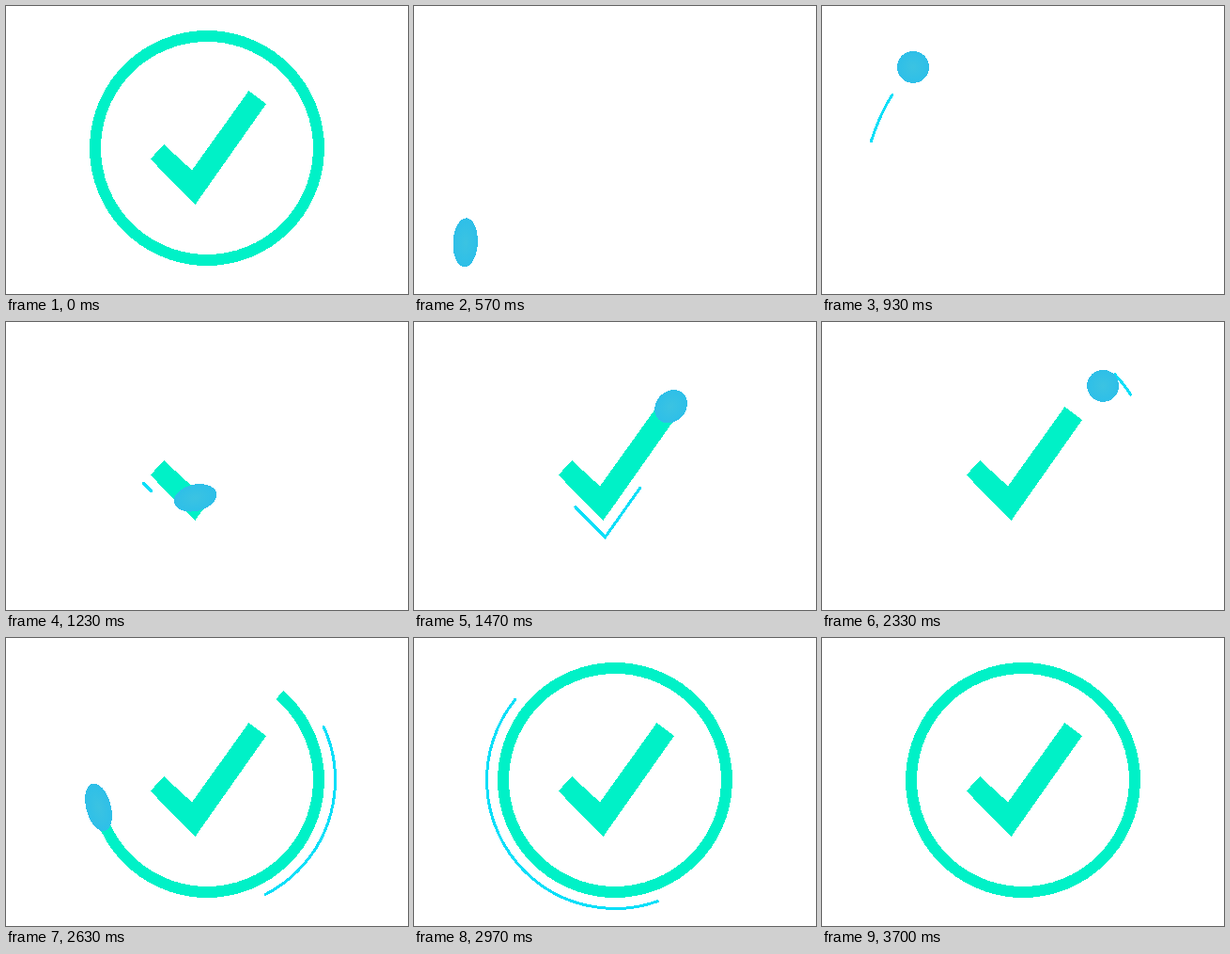
An HTML page for the animation above (4010 ms loop, 428 px wide and 306 px high).

```html
<!DOCTYPE html>
<html lang="en">
<head>
<meta charset="utf-8">
<title>Check mark</title>
<style>
  html, body { margin: 0; width: 100%; height: 100%; overflow: hidden; background: #fff; }
  svg { display: block; width: 100%; height: 100%; shape-rendering: crispEdges; }
  .thin { fill: none; stroke: #0adff8; stroke-width: 3; stroke-linecap: round; }
  .bubble { fill: none; stroke: #2fb9dc; stroke-width: 1; }
</style>
</head>
<body>
<svg viewBox="0 0 428 306">
  <defs>
    <radialGradient id="blue">
      <stop offset="0" stop-color="#3bc3e2"/>
      <stop offset="1" stop-color="#2ebfe8"/>
    </radialGradient>
    <mask id="reveal" maskUnits="userSpaceOnUse" x="0" y="0" width="428" height="306">
      <path id="bounce" d="M110 65Q135 128 161 155L197 193L267 97L296 65" fill="none" stroke="#fff" stroke-width="28"/>
    </mask>
  </defs>
  <circle id="ring" cx="214" cy="151" r="119" pathLength="360" transform="rotate(-49.5 214 151)" fill="none" stroke="#00f1c7" stroke-width="12"/>
  <path id="check" d="M168.4 147.4L198 174.5L258.5 90L277 104L201.5 211L153.6 162.5Z" fill="#00f1c7"/>
  <path id="rise" class="thin" pathLength="1" d="M41 185Q55 124 75 94"/>
  <path id="hook" class="thin" pathLength="1" d="M146.5 171.5L203.6 228.6L287 111"/>
  <circle id="orbit" class="thin" cx="214" cy="151" r="136.5" pathLength="360" transform="rotate(-45 214 151)"/>
  <circle id="bubbleA" class="bubble"/>
  <circle id="bubbleB" class="bubble"/>
  <ellipse id="ball" fill="url(#blue)"/>
</svg>
<script>
const LOOP = 4010;
const RISE = 500, DROP = 1000, CORNER = 1220, REST = 1680, SPIN = 2260, SPIN_END = 2950, DONE = 3700;
const RADIUS = 17, RING_START = -46.3;

const $ = id => document.getElementById(id);
const set = (id, attrs) => { for (const k in attrs) $(id).setAttribute(k, attrs[k]); };
const span = (t, from, to) => Math.min(1, Math.max(0, (t - from) / (to - from)));
const mix = (a, b, u) => a + (b - a) * u;

// S-curve with separate sharpness at its start and end.
const ease = (u, p, q = p) => u ** p / (u ** p + (1 - u) ** q);
const easeOut = u => 1 - (1 - u) ** 2;

const bounceLength = $('bounce').getTotalLength();
const climbLength = Math.hypot(70, 96) + Math.hypot(29, 32);
const dropLength = bounceLength - climbLength;

const bounced = t => dropLength * span(t, DROP, CORNER) ** 1.6
  + climbLength * easeOut(span(t, CORNER, REST));
const swept = t => 360 * ease(span(t, SPIN, SPIN_END), 2.4);

function ballAt(t) {
  if (t < DROP) {
    return [53 + 57.5 * span(t, RISE, DROP) ** 1.8, 63.5 + .00121 * (t - 965) ** 2];
  }
  if (t < SPIN) {
    const { x, y } = $('bounce').getPointAtLength(bounced(t));
    return [x, y];
  }
  const a = (RING_START + swept(t)) * Math.PI / 180;
  return [214 + 119 * Math.cos(a), 151 + 119 * Math.sin(a)];
}

function dash(id, from, to, total = 1) {
  const len = to - from;
  const whole = from <= 0 && to >= total;
  set(id, {
    visibility: len > total * .001 ? 'visible' : 'hidden',
    'stroke-dasharray': whole ? 'none' : `${Math.max(len, 0)} ${total * 2}`,
    'stroke-dashoffset': whole ? 0 : -from
  });
}

// The ball stretches along its direction of travel.
function drawBall(t) {
  const [x, y] = ballAt(t), a = ballAt(t - 30), b = ballAt(t + 30);
  const dx = b[0] - a[0], dy = b[1] - a[1];
  const stretch = 1 + .53 * span(Math.hypot(dx, dy) / 60, .22, .67);
  const r = RADIUS * (1 - span(t, SPIN_END - 90, SPIN_END));
  set('ball', {
    visibility: t > RISE && r > 0 ? 'visible' : 'hidden',
    rx: r * stretch,
    ry: r * stretch ** -.6,
    transform: `translate(${x} ${y}) rotate(${Math.atan2(dy, dx) * 180 / Math.PI})`
  });
}

function drawBubble(id, t, start, end, from, to) {
  const u = span(t, start, end), e = easeOut(u);
  set(id, {
    visibility: u > 0 && u < 1 ? 'visible' : 'hidden',
    cx: mix(from[0], to[0], e),
    cy: mix(from[1], to[1], e),
    r: 4.5 * Math.min(1, (1 - u) * 4)
  });
}

function draw(t) {
  const idle = t < RISE || t >= DONE;
  $('check').setAttribute('mask', idle || t >= REST ? 'none' : 'url(#reveal)');
  dash('bounce', 0, bounced(t), bounceLength);
  dash('ring', 0, idle ? 360 : swept(t), 360);
  dash('rise', span(t, 760, 1010) ** 2.2, easeOut(span(t, 600, 930)));
  dash('hook', span(t, 1300, 1840) ** 1.6, ease(span(t, 1195, 1640), 1.2));
  dash('orbit', 360 * ease(span(t, 2200, DONE), 2.63, 1.39), 360 * ease(span(t, 2221, 3353), 1.5), 360);
  drawBubble('bubbleA', t, 1720, 2010, [297, 56], [300.5, 32]);
  drawBubble('bubbleB', t, 1840, 2070, [300, 54], [322, 42]);
  drawBall(t);
}

const begin = performance.now();
function tick() {
  draw((performance.now() - begin) % LOOP);
  requestAnimationFrame(tick);
}
tick();
</script>
</body>
</html>
```
